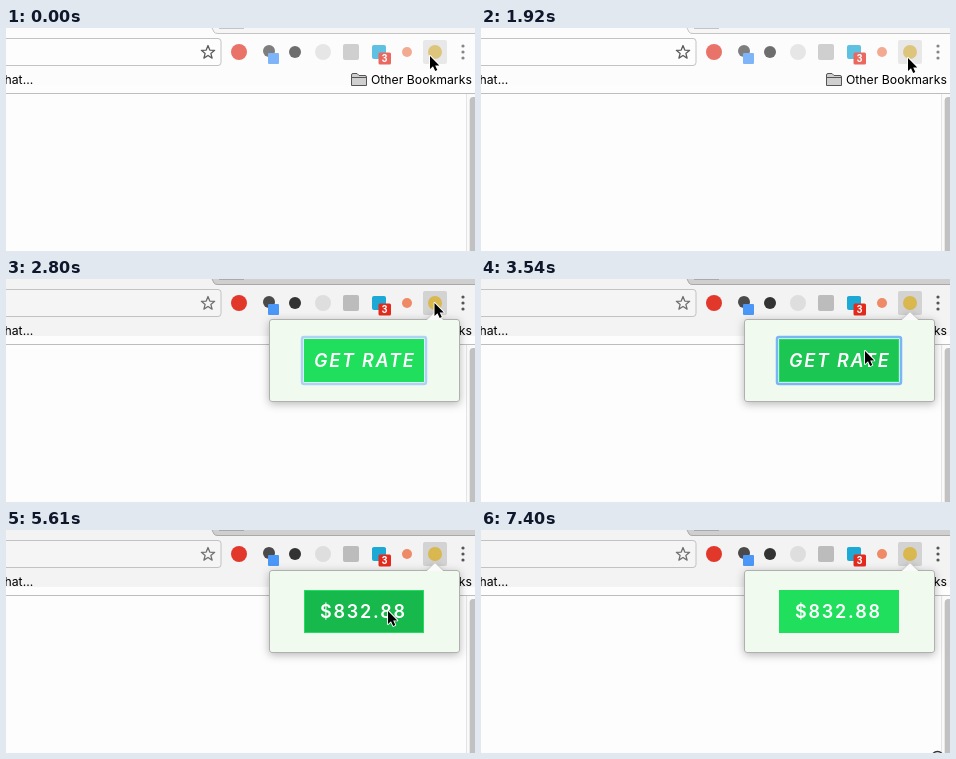
Write an HTML page that moves like this. It is 469x223 px and loops after 7500 ms.

```html
<!DOCTYPE html>
<html lang="en">
<head>
<meta charset="utf-8">
<title>Rate button in a browser toolbar</title>
<style>
  html, body { margin: 0; width: 100%; height: 100%; overflow: hidden; background: #fdfdfd; }
  svg { display: block; width: 100vw; height: 100vh; }
  .ui { font: 12.25px Inter, sans-serif; fill: #000; }
  #label { font: 600 18px Inter, sans-serif; letter-spacing: 1.8px; fill: #fff; }
  .badge { font: bold 10px Roboto, sans-serif; fill: #fff; text-anchor: middle; }
</style>
</head>
<body>
<svg viewBox="0 0 469 223">
  <defs>
    <filter id="shadow" x="-20%" y="-30%" width="140%" height="170%">
      <feDropShadow dx="0" dy="2" stdDeviation="4.5" flood-opacity=".28"/>
    </filter>
  </defs>

  <rect width="469" height="223" fill="#fdfdfd"/>
  <rect id="toolbar" width="469" height="57"/>
  <path id="strip" d="M206 0L208 4Q209 6 212 6H469V0Z"/>
  <path id="tabLine" d="M206 0L208 4Q209 5.5 212 5.5H469M213 .5H238" fill="none"/>
  <path d="M0 65.500H469" stroke="#bdbdbd"/>

  <rect id="address" x="-6" y="10.500" width="221" height="27" rx="3" stroke="#c2c2c2"/>
  <path id="star" fill="none" stroke-width="1.300" stroke-linejoin="round"/>

  <rect id="hover" x="417" y="12" width="24" height="24" rx="2"/>
  <g id="icons">
    <circle cx="233" cy="24" r="8" fill="#e2382b"/>
    <circle cx="263" cy="23" r="6" fill="#4a4a4a"/>
    <rect x="262" y="25" width="11" height="11" rx="1" fill="#4a97f7"/>
    <circle cx="289" cy="24" r="6" fill="#333"/>
    <circle cx="317" cy="24" r="8" fill="#dedede"/>
    <rect x="337" y="16" width="16" height="16" rx="2" fill="#bcbcbc"/>
    <rect x="366" y="17" width="14" height="14" rx="2" fill="#1da9d6"/>
    <rect x="372.500" y="24.500" width="12.500" height="12" rx="1.500" fill="#e32a1c"/>
    <text class="badge" x="378.500" y="34">3</text>
    <circle cx="401" cy="24" r="5" fill="#ee8a66"/>
    <circle cx="429" cy="24" r="7" fill="#d9b84f"/>
    <g fill="#555">
      <circle cx="457" cy="18" r="1.600"/><circle cx="457" cy="24" r="1.600"/><circle cx="457" cy="30" r="1.600"/>
    </g>
  </g>

  <text class="ui" x="-1.500" y="56">hat...</text>
  <path d="M345.500 57.500V47Q345.500 45.500 347 45.500H351L353 47.500H359Q360.500 47.500 360.500 49V57.500ZM345.500 49.500H360.500" fill="#cfcfcf" stroke="#555"/>
  <text class="ui" x="365" y="56">Other Bookmarks</text>

  <rect x="460" y="66" width="9" height="157" fill="#fafafa"/>
  <path d="M460.500 66V223" stroke="#e4e4e4"/>
  <rect x="463.700" y="69" width="8" height="170" rx="3.500" fill="#c1c1c1"/>

  <g id="popup">
    <path d="M266 40.500H421L429 33L437 40.500H451Q453.500 40.500 453.500 43V120Q453.500 122.500 451 122.500H266Q263.500 122.500 263.500 120V43Q263.500 40.500 266 40.500Z" fill="#f1faee" stroke="#b0b0b0" filter="url(#shadow)"/>
    <path d="M421 41L429 33L437 41Z" fill="#fafafa"/>
    <rect id="ring" x="296" y="58" width="124" height="47" rx="2" fill="#eaf6f6" stroke-width="2.500"/>
    <rect id="button" x="298.500" y="60.500" width="119" height="42" stroke="#20df5d"/>
    <text id="label" y="88"></text>
  </g>

  <circle id="knob" cx="456.500" cy="227.500" r="6" fill="#fff" stroke="#333" stroke-width="1.300"/>
  <path id="cursor" d="M0 0V13L3 10.200L5.200 15L7.300 14L5.200 9.400H9.300Z" fill="#000" stroke="#fff" stroke-width="1.800" stroke-linejoin="round" paint-order="stroke"/>
</svg>

<script>
const LOOP = 7500, START = 886, STEP = 147.2;
const el = id => document.getElementById(id);
const set = (id, attrs) => {
  for (const name in attrs) el(id).setAttribute(name, attrs[name]);
};
const show = (id, on) => set(id, { visibility: on ? "visible" : "hidden" });

// Pointer path: [step, x, y]
const path = [
  [-1, 424, 28], [1, 412, 73], [3, 406, 98], [4, 395, 107], [5, 402, 92],
  [7, 427, 30], [8, 428.5, 24], [14, 428.5, 24], [16, 402, 52], [18, 384, 72],
  [20, 382, 81], [32, 382, 81], [34, 412, 92], [36, 433, 100], [39, 433, 100],
  [41, 452, 192]
];
// Button hover amount: [step, value]
const hoverKeys = [[17, 0], [18, 0.62], [20, 1], [33, 1], [36, 0]];

function sample(keys, step) {
  const next = keys.findIndex(key => key[0] > step);
  if (next === 0) return keys[0].slice(1);
  if (next < 0) return keys[keys.length - 1].slice(1);
  const a = keys[next - 1], b = keys[next];
  const f = (step - a[0]) / (b[0] - a[0]);
  return a.slice(1).map((v, i) => v + (b[i + 1] - v) * f);
}

const mix = (a, b, f) => `rgb(${a.map((v, i) => Math.round(v + (b[i] - v) * f))})`;

function starPath(cx, cy, outer, inner) {
  const points = Array.from({ length: 10 }, (_, i) => {
    const r = i % 2 ? inner : outer, a = i * Math.PI / 5 - Math.PI / 2;
    return `${cx + r * Math.cos(a)} ${cy + r * Math.sin(a)}`;
  });
  return `M${points.join("L")}Z`;
}
set("star", { d: starPath(202, 24.5, 7, 3) });

function draw(t) {
  const step = Math.max(-1, Math.floor((t - START) / STEP));
  const active = step >= 10, loaded = step >= 24;

  set("toolbar", { fill: active ? "#f3f3f3" : "#fcfcfc" });
  set("strip", { fill: active ? "#cfcfcf" : "#f6f6f6" });
  set("tabLine", { stroke: active ? "#a9a9a9" : "#c4c4c4" });
  set("address", { fill: active ? "#f5f5f5" : "#fdfdfd" });
  set("star", { stroke: active ? "#707070" : "#5c5c5c" });
  set("icons", { opacity: active ? 1 : 0.7 });
  set("hover", { fill: active ? "#d3d3d3" : "#e8e8e8" });
  show("hover", step < 0 || step >= 7);

  show("popup", step >= 13);
  show("ring", step >= 13 && !loaded);
  set("ring", { stroke: step < 14 ? "#acd3f3" : "#7ab6f6" });
  set("button", { fill: mix([32, 223, 93], [24, 185, 76], sample(hoverKeys, step)[0]) });
  set("label", { x: loaded ? 314 : 308, "font-style": loaded ? "normal" : "italic" });
  el("label").style.fontStyle = loaded ? "normal" : "italic";
  el("label").textContent = loaded ? "$832.88" : "GET RATE";

  const [x, y] = sample(path, step);
  set("cursor", { transform: `translate(${x} ${y})` });
  show("cursor", step < 42);
  show("knob", t >= 7395);
}

const start = performance.now();
function tick() {
  draw((performance.now() - start) % LOOP);
  requestAnimationFrame(tick);
}
tick();
</script>
</body>
</html>
```
